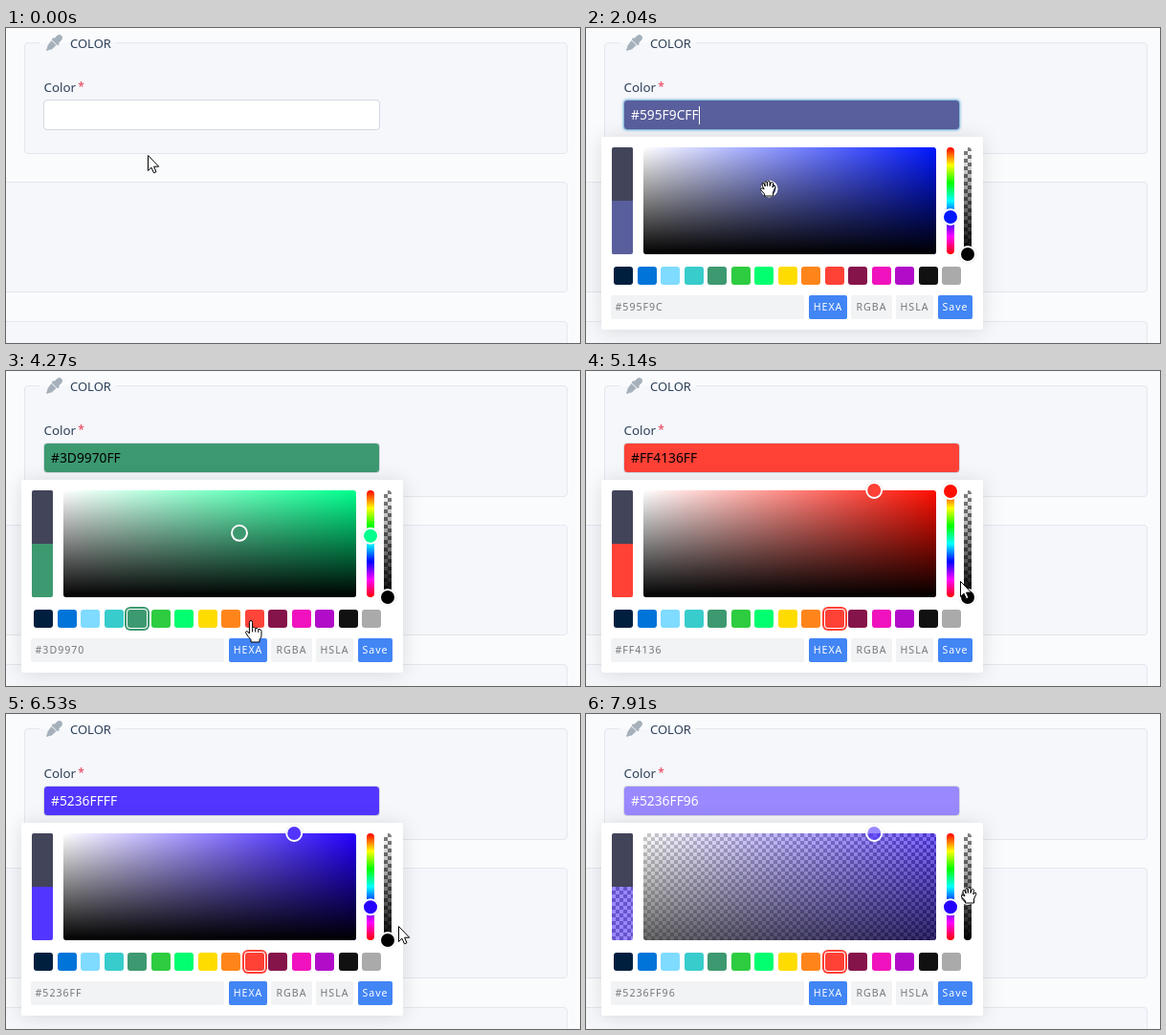
Write an HTML page that moves like this. It is 600 px wide and 330 px high and loops after 7990 ms.

```html
<!DOCTYPE html>
<html lang="en">
<head>
<meta charset="utf-8">
<title>Color picker</title>
<style>
html, body { margin: 0; width: 600px; height: 330px; overflow: hidden; }
body { position: relative; background: #fafbfd; font-family: "Noto Sans", "Open Sans", sans-serif; color: #2f4158; }
body div, body svg { position: absolute; box-sizing: border-box; }
body div { white-space: pre; }
.set { border: 1px solid #e3e7ed; border-radius: 4px; background: #f5f7fb; }
#gap { left: 35px; top: 15px; width: 80px; height: 1px; background: #f7f9fc; }
#legend { left: 67px; top: 6px; font-size: 13px; line-height: 20px; }
#label { left: 39.5px; top: 52px; font-size: 13.4px; line-height: 20px; }
#label span { color: #e8364f; margin-left: 2px; font-size: 12px; position: relative; top: -1px; }
#field { left: 39px; top: 75px; width: 352px; height: 32px; border: 1px solid #d3d8e0; border-radius: 4px;
  background: #fff; padding-left: 7px; font-size: 13.8px; line-height: 30px; }
#field.focus { border-color: #86bbdc; box-shadow: 0 0 2px 1px rgba(120, 180, 220, .5); }
#caret { display: inline-block; width: 1px; height: 19px; margin-right: -1px; background: currentColor; vertical-align: middle; position: relative; top: -1px; }
#panel { left: 16px; top: 114px; width: 399px; height: 202px; background: #fff; border-radius: 2px;
  box-shadow: 0 2px 24px rgba(0, 0, 0, .1), 0 0 16px rgba(0, 0, 0, .03); }
.check { background: repeating-conic-gradient(#808080 0 25%, #fff 0 50%) 0 0 / 8px 8px; overflow: hidden; }
.check div { inset: 0; }
#preview { left: 11px; top: 11px; width: 22px; height: 112px; border-radius: 2px; }
#preview #last { height: 56px; bottom: auto; background: #42445a; }
#preview #now { top: 56px; }
#palette { left: 44px; top: 11px; width: 306px; height: 112px; border-radius: 3px; }
#hue, #alpha { top: 11px; width: 8px; height: 112px; border-radius: 4px; }
#hue { left: 361px; background: linear-gradient(red, #ff0, #0f0, #0ff, #00f, #f0f, red); }
#alpha { left: 379px; }
#alpha div { background: linear-gradient(transparent, #000); }
.knob { left: -9px; top: -9px; width: 18px; height: 18px; border: 2px solid #fff; border-radius: 50%; box-shadow: 0 0 2px rgba(0, 0, 0, .15); }
.swatch { top: 136px; width: 20px; height: 19px; border-radius: 3px; }
.box { top: 166px; height: 25px; border-radius: 2px; background: #f1f3f4; color: #75797e;
  font-size: 10.6px; letter-spacing: 1px; line-height: 25px; text-align: center; }
.box.on { background: #4285f4; color: #fff; }
#result { text-align: left; padding-left: 4.5px; }
#cursor { left: 0; top: 0; overflow: visible; }
#cursor path { fill: #fff; stroke: #000; stroke-width: 1; stroke-linejoin: round; }
#cursor #i { fill: none; stroke-width: 1.2; }
</style>
</head>
<body>
<div class="set" style="left:19px;top:15px;width:568px;height:117px"></div>
<div class="set" style="left:-9px;top:161px;width:596px;height:116px"></div>
<div class="set" style="left:-9px;top:307px;width:596px;height:60px"></div>
<div id="gap"></div>
<svg style="left:42px;top:7px" width="17" height="17" viewBox="0 0 17 17" fill="#a5b0ba">
  <path d="M5.5 6 10.5 11 6 15.2Q5 16 3.5 15.7L1 17 0 16 1.2 13.5Q1 12 1.8 11ZM6.2 4.2Q7.2 2.4 8.6 3.8L11.3 1Q14 -1 16 1Q18 3 16 5.7L13.2 8.4Q14.5 9.8 12.6 10.8L11.8 11.2 5.8 5.2Z"/>
</svg>
<div id="legend">COLOR</div>
<div id="label">Color<span>*</span></div>
<div id="field"><span id="value"></span><span id="caret"></span></div>

<div id="panel">
  <div id="preview" class="check"><div id="last"></div><div id="now"></div></div>
  <div id="palette" class="check"><div id="shade"></div></div>
  <div id="hue"></div>
  <div id="alpha" class="check"><div></div></div>
  <div class="knob" id="knobColor"></div>
  <div class="knob" id="knobHue"></div>
  <div class="knob" id="knobAlpha"></div>
  <div class="box" id="result" style="left:10px;width:202px"></div>
  <div class="box on" style="left:217px;width:40px">HEXA</div>
  <div class="box" style="left:261px;width:43px">RGBA</div>
  <div class="box" style="left:308px;width:39px">HSLA</div>
  <div class="box on" style="left:352px;width:36px">Save</div>
</div>

<svg id="cursor" width="1" height="1">
  <path id="a" d="M.5 .5V16.5L4 13.2 6.5 18.8 9 17.7 6.6 12.2H11.7Z"/>
  <path id="i" d="M-3 -8H-1L0 -7 1 -8H3M0 -7V7M-3 8H-1L0 7 1 8H3"/>
  <path id="p" d="M-1.6 1.8Q-1.5 0 0 0T1.6 1.8V7.6Q3.4 6 4.7 8.2Q6.5 6.8 7.8 9.2Q10.6 8.4 11 11V16Q10.5 18.5 9 20V22.5H0V20Q-3 17 -5.3 13Q-5.5 10 -3.3 11.5L-1.6 13.5ZM4.7 8.5V12M7.8 9.5V12.5M1.6 8V12"/>
  <path id="g" d="M-4 1 -6 -3Q-6.5 -6 -4.5 -5.5L-2.8 -2 -3.3 -6Q-2.5 -8.5 -1 -7L-.6 -2.5V-7Q.5 -9 2 -7V-2.5L3.2 -6Q5 -7.5 5.5 -5.5L4.8 -1 6 -2.5Q8 -3.5 7.8 -1.5L5.5 4V8H-3.5V6L-7.5 1.5Q-8 -.8 -5.5 0Z"/>
  <path id="f" d="M-5 0V-2.5Q-4.5 -5 -2.6 -4Q-1 -6 .6 -4.3Q2.2 -5.8 3.6 -3.8Q6.2 -4.5 6.4 -1.5V2L5 5V8H-3.5V6L-6.8 2.5Q-7.2 0 -5 0ZM-2.4 -3.5V-1M.7 -3.8V-1M3.7 -3.3V-1"/>
</svg>

<script>
const LOOP = 7990, FOCUS = 550, OPEN = 615, PICK = 1780, GREEN = 3500, RED = 4500;
const $ = id => document.getElementById(id);

const swatches = '001f3f 0074d9 7fdbff 39cccc 3d9970 2ecc40 01ff70 ffdc00 ff851b ff4136 85144b f012be b10dc9 111111 aaaaaa'
  .split(' ').map((c, i) => {
    const el = document.createElement('div');
    el.className = 'swatch';
    el.style.left = 13 + i * 24.5 + 'px';
    el.style.background = el.dataset.color = '#' + c;
    $('panel').append(el);
    return el;
  });

function toHsv(hex) {
  const [r, g, b] = [0, 2, 4].map(i => parseInt(hex.substr(i, 2), 16));
  const max = Math.max(r, g, b), d = max - Math.min(r, g, b);
  const h = max === r ? (g - b) / d : max === g ? 2 + (b - r) / d : 4 + (r - g) / d;
  return [h * 60, d / max, max / 255];
}

function toRgb(h, s, v) {
  return [5, 3, 1].map(n => {
    const k = (n + h / 60) % 6;
    return Math.round(255 * v * (1 - s * Math.max(0, Math.min(k, 4 - k, 1))));
  });
}

// time, colour, then whether it glides to the next key
const colors = [
  [0, '42445A'], [PICK, '525680', 1], [2040, '595F9C', 1], [2490, '2E3583'],
  [GREEN, '3D9970'], [RED, 'FF4136'], [5740, '36FFBF'], [5860, '36FFBF', 1], [6130, '5236FF']
].map(([t, hex, glide]) => [t, ...toHsv(hex), glide]);

// time, x, y, pointer shape
const moves = [
  [0, 148, 133, 'a'], [80, 148, 133, 'a'], [170, 132, 106, 'i'], [250, 124, 93, 'i'],
  [1090, 124, 93, 'i'], [1200, 135, 116, 'a'], [1290, 145, 135, 'g'], [1630, 169, 181, 'g'],
  [1780, 169, 181, 'g'], [2040, 190, 168, 'g'], [2120, 202, 170, 'f'], [2490, 258, 179, 'g'],
  [2640, 258, 179, 'g'], [2850, 180, 238, 'a'], [3030, 92, 266, 'p'], [3270, 134.5, 261.5, 'p'],
  [3600, 134.5, 261.5, 'p'], [3960, 233, 261.5, 'p'], [4120, 233, 261.5, 'p'], [4270, 256, 261.5, 'p'],
  [4650, 256, 261.5, 'p'], [4760, 285, 256, 'a'], [5140, 391, 220, 'a'], [5280, 390, 204, 'a'],
  [5360, 390, 204, 'a'], [5450, 384, 188, 'g'], [5590, 382, 175, 'g'], [5740, 382, 175, 'f'],
  [5860, 382, 175, 'f'], [6130, 387, 202, 'f'], [6300, 387, 202, 'g'], [6530, 387, 202, 'g'],
  [6530, 410, 222, 'a'], [6610, 410, 222, 'a'], [6740, 407, 233, 'a'], [6820, 401, 237, 'g'],
  [6920, 400, 239, 'g'], [7220, 400, 239, 'f'], [7760, 400, 190, 'f'], [7910, 400, 190, 'g']
];

const clamp = x => Math.max(0, Math.min(1, x));

function at(keys, t) {
  let i = keys.length - 1;
  while (keys[i][0] > t) i--;
  const a = keys[i], b = keys[i + 1] || a;
  return { a, b, p: b === a ? 0 : (t - a[0]) / (b[0] - a[0]) };
}
const mix = (k, n) => k.a[n] + (k.b[n] - k.a[n]) * k.p;

const hex2 = n => n.toString(16).toUpperCase().padStart(2, '0');
const place = (el, x, y) => { el.style.transform = `translate(${x}px, ${y}px)`; };

function drawField(t, hex, alphaHex, rgb, fill) {
  const picked = t >= PICK, focused = t >= FOCUS && t < GREEN;
  const light = rgb[0] * .299 + rgb[1] * .587 + rgb[2] * .114 > 110;
  const field = $('field');
  field.className = focused ? 'focus' : '';
  field.style.background = picked ? `linear-gradient(${fill}, ${fill}) #fff` : '#fff';
  field.style.color = picked ? (light ? '#000' : '#fff') : '#222';
  $('value').textContent = picked ? hex + alphaHex : '';
  const idle = t < PICK ? t - FOCUS : Math.max(0, t - 2490);
  $('caret').style.visibility = focused && idle % 1060 < 530 ? 'visible' : 'hidden';
}

function drawPanel(t, [h, s, v], alpha, hex, alphaHex, fill) {
  const p = clamp((t - OPEN) / 300);
  $('panel').style.opacity = 1 - (1 - p) ** 2.4;
  $('now').style.background = fill;
  $('shade').style.background = `linear-gradient(to top, rgba(0,0,0,${alpha}), transparent),
    linear-gradient(to left, hsla(${h},100%,50%,${alpha}), rgba(255,255,255,${alpha}))`;
  place($('knobColor'), 44 + 306 * s, 11 + 112 * (1 - v));
  place($('knobHue'), 365, 11 + 112 * h / 360);
  place($('knobAlpha'), 383, 11 + 112 * alpha);
  $('knobColor').style.backgroundColor = fill;
  $('knobHue').style.backgroundColor = `hsl(${h},100%,50%)`;
  $('knobAlpha').style.backgroundColor = `rgba(0,0,0,${alpha})`;
  $('result').textContent = hex + (alpha < 1 ? alphaHex : '');
}

function drawSwatches(t, x, shape) {
  const hover = shape === 'p' ? Math.round((x - 39) / 24.5) : -1;
  const chosen = t >= RED ? 9 : t >= GREEN ? 4 : -1;
  swatches.forEach((el, i) => {
    el.style.filter = i === hover ? 'brightness(1.05)' : 'none';
    el.style.boxShadow = i === chosen ? `0 0 0 1px #fff, 0 0 0 3px ${el.dataset.color}` : 'none';
  });
}

function draw(t) {
  const c = at(colors, t);
  if (!c.a[4]) c.p = 0;
  const hsv = [1, 2, 3].map(n => mix(c, n));
  const alpha = 1 - (1 - 150 / 255) * clamp((t - 7220) / 540);
  const rgb = toRgb(...hsv);
  const hex = '#' + rgb.map(hex2).join('');
  const alphaHex = hex2(Math.round(alpha * 255));
  const fill = `rgba(${rgb},${alpha})`;
  drawField(t, hex, alphaHex, rgb, fill);
  drawPanel(t, hsv, alpha, hex, alphaHex, fill);

  const m = at(moves, t), x = mix(m, 1), shape = m.a[3];
  drawSwatches(t, x, shape);
  place($('cursor'), x, mix(m, 2));
  for (const path of $('cursor').children) path.style.display = path.id === shape ? '' : 'none';
}

const start = performance.now();
function tick() {
  draw((performance.now() - start) % LOOP);
  requestAnimationFrame(tick);
}
tick();
</script>
</body>
</html>
```
